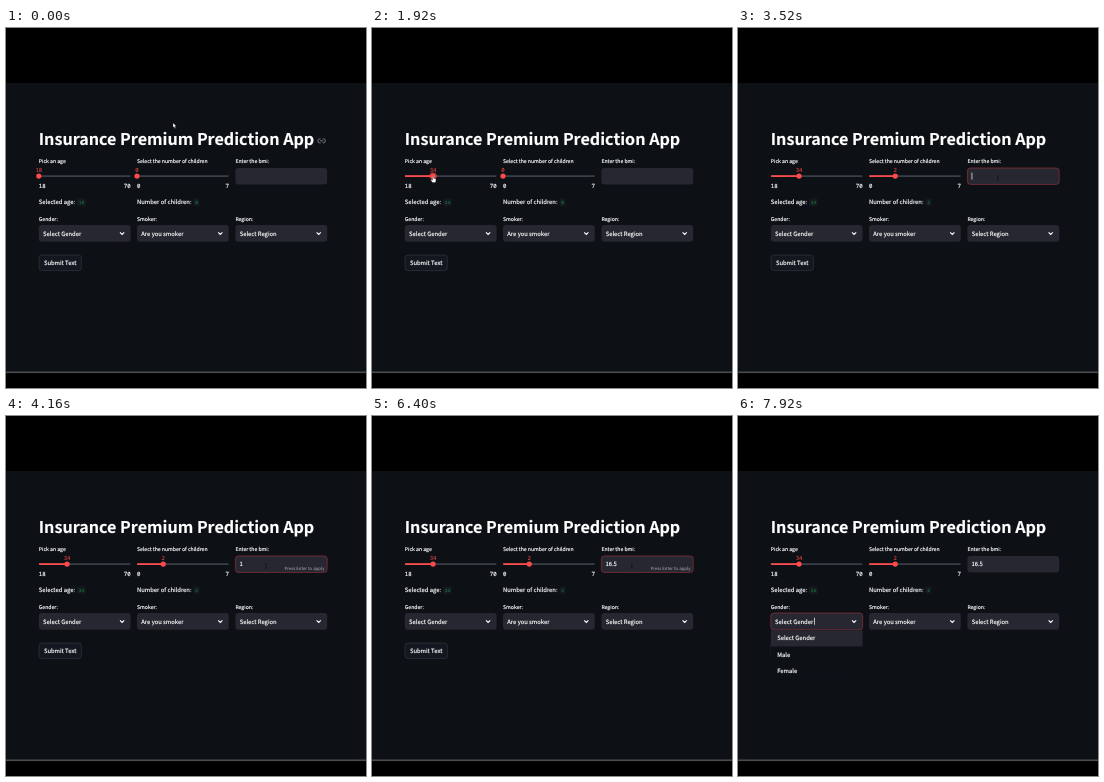
These frames come from a looping animation (360x360 px, 8 s). An HTML page:

```html
<!DOCTYPE html>
<html lang="en">
<head>
<meta charset="utf-8">
<title>Premium prediction form</title>
<style>
  html, body { margin: 0; width: 100%; height: 100%; overflow: hidden; background: #000; }
  svg { display: block; width: 100vw; height: 100vh; }
  text {
    font-family: "Noto Sans CJK JP", "Noto Sans CJK SC", "Noto Sans CJK", "Noto Sans", sans-serif;
    font-size: 5.87px; fill: #fff; stroke: #fff; stroke-width: 0.16px;
    text-rendering: geometricPrecision; white-space: pre;
  }
  .title { font-size: 16.13px; font-weight: 700; }
  .label { font-size: 5.14px; }
  .hint { font-size: 4.32px; fill: #b0b1b6; stroke: none; }
  .mono { font-family: "Noto Sans Mono", "DejaVu Sans Mono", monospace; font-size: 5.7px; }
  .red { fill: #ff4b4b; stroke: none; }
  .code { font-size: 4.39px; fill: #178f41; stroke: none; }
  .mid { text-anchor: middle; }
  .end { text-anchor: end; }
</style>
</head>
<body>
<svg id="stage" viewBox="0 0 360 360"></svg>
<script>
const LOOP = 8000;
const RED = '#ff4b4b', FOCUS = '#a5343b', FIELD = '#262730', PAGE = '#0d1116';
const COLS = [32.8, 131, 229.4], COL_W = 91.8;
const stage = document.getElementById('stage');

function add(tag, attrs, parent = stage) {
  const el = document.createElementNS('http://www.w3.org/2000/svg', tag);
  for (const k in attrs) el.setAttribute(k, attrs[k]);
  parent.appendChild(el);
  return el;
}
function text(x, y, str, cls = '', parent = stage) {
  const el = add('text', { x, y, class: cls }, parent);
  el.textContent = str;
  return el;
}
const rect = (x, y, width, height, fill, rx = 0, parent = stage) =>
  add('rect', { x, y, width, height, fill, rx }, parent);
const path = (d, attrs, parent = stage) => add('path', { d, fill: 'none', ...attrs }, parent);
const show = (el, on) => el.setAttribute('visibility', on ? 'visible' : 'hidden');

function slider(x, label, min, max) {
  text(x, 135.1, label, 'label');
  rect(x, 147.3, COL_W, 1.6, '#3b3e47', 0.8);
  const fill = rect(x, 147.3, 0, 1.6, RED, 0.8);
  const ring = add('circle', { cy: 148.1, r: 3.8, fill: RED, opacity: 0.5 });
  const thumb = add('circle', { cy: 148.1, r: 2.6, fill: RED });
  const value = text(0, 143.7, '', 'mono red mid');
  text(x, 159.7, min, 'mono');
  text(x + COL_W, 159.7, max, 'mono end');
  return (v, focused) => {
    const w = (v - min) / (max - min) * COL_W;
    fill.setAttribute('width', w);
    for (const c of [ring, thumb]) c.setAttribute('cx', x + w);
    value.setAttribute('x', x + w);
    value.textContent = v;
    show(ring, focused);
  };
}

function readout(x, label, codeX, width) {
  text(x, 176.2, label);
  rect(codeX, 170.6, width, 7.4, '#141a1e', 1.2);
  const code = text(codeX + width / 2, 176, '', 'mono code mid');
  return v => { code.textContent = v; };
}

function select(x, label, placeholder) {
  text(x, 192.7, label, 'label');
  const box = rect(x, 197, COL_W, 16.8, FIELD, 3);
  text(x + 4.3, 207.7, placeholder);
  path(`M${x + 81.2} 204.4l2.1 2.1l2.1-2.1`, { stroke: '#fff', 'stroke-width': 1.1 });
  return box;
}

// Page
rect(0, 55, 360, 288.5, PAGE);
rect(0, 343.4, 360, 1.7, '#484a4d');
text(32.8, 117.2, 'Insurance Premium Prediction App', 'title');
const link = path('M314.6 110.9h-.8a2 2 0 0 0 0 4h.8M316.6 110.9h.8a2 2 0 0 1 0 4h-.8M313.9 112.9h3.4',
  { stroke: '#8c8f95', 'stroke-width': 0.8 });

const setAge = slider(COLS[0], 'Pick an age', 18, 70);
const setKids = slider(COLS[1], 'Select the number of children', 0, 7);
const readAge = readout(COLS[0], 'Selected age:', 71, 8.8);
const readKids = readout(COLS[1], 'Number of children:', 187.4, 6.1);

text(COLS[2], 135.1, 'Enter the bmi:', 'label');
const bmiBox = rect(COLS[2], 140, COL_W, 16.4, FIELD, 3);
const bmi = text(233.4, 150.4, '');
const hint = text(318.4, 154.3, 'Press Enter to apply', 'hint end');

const genderBox = select(COLS[0], 'Gender:', 'Select Gender');
select(COLS[1], 'Smoker:', 'Are you smoker');
select(COLS[2], 'Region:', 'Select Region');

add('rect', { x: 33, y: 227, width: 42.4, height: 15.6, rx: 3, fill: '#131720', stroke: '#3c4048', 'stroke-width': 0.5 });
text(37.9, 237, 'Submit Text');

const menu = add('g', {});
rect(COLS[0], 214.2, COL_W, 49.4, PAGE, 2, menu);
rect(COLS[0], 214.2, COL_W, 16.2, FIELD, 0, menu);
['Select Gender', 'Male', 'Female'].forEach((s, i) => text(39.2, 224.3 + i * 16.3, s, '', menu));

const caret = add('rect', { width: 0.7, height: 7, fill: '#fff' });

// Mouse pointers, drawn around their hot spot
const mouse = add('g', {});
const pointers = {
  arrow: path('M0 0v4.6l1.1-1l.8 1.8l.8-.4l-.8-1.7h1.5z',
    { fill: '#fff', stroke: '#000', 'stroke-width': 0.25 }, mouse),
  hand: path('M-.5 0q.6-.6 1 0v2l2 .5q.7.3.5 1.2l-.5 2.6h-3l-1.8-2.4q0-.8.8-.5l1 .6z',
    { fill: '#fff', stroke: '#000', 'stroke-width': 0.25 }, mouse),
  beam: path('M-.9-2.1h1.8M0-2.1v4.2M-.9 2.1h1.8', { stroke: '#0a0b0e', 'stroke-width': 0.55 }, mouse)
};

// time, x, y
const route = [
  [0, 167, 95], [160, 167, 95], [1000, 66, 149.6], [1280, 64.8, 150], [1600, 61, 148.2],
  [2060, 61, 148.2], [2560, 162.2, 142.6], [2760, 157.4, 148], [3000, 157.4, 148],
  [3360, 259.8, 150], [6560, 259.8, 150], [7200, 82, 205.5]
];
const keys = [[3600, '1'], [4800, '16'], [5360, '16.'], [5680, '16.5']];
const AGE_CLICK = 1680, KIDS_CLICK = 2840, BMI_CLICK = 3400, GENDER_CLICK = 7360, RERUN = 240;

const ease = p => p * p * (3 - 2 * p);
function mouseAt(t) {
  const i = route.findIndex(r => r[0] > t);
  if (i < 0) return route[route.length - 1].slice(1);
  const [t0, x0, y0] = route[i - 1], [t1, x1, y1] = route[i];
  const p = ease((t - t0) / (t1 - t0));
  return [x0 + (x1 - x0) * p, y0 + (y1 - y0) * p];
}
const inside = (x, y, left, top, w, h) => x >= left && x <= left + w && y >= top && y <= top + h;

function pointerAt(x, y) {
  if (inside(x, y, COLS[2], 140, COL_W, 16.4)) return 'beam';
  const onSlider = COLS.slice(0, 2).some(c => inside(x, y, c, 144, COL_W, 7));
  const onSelect = COLS.some(c => inside(x, y, c, 197, COL_W, 17));
  return onSlider || onSelect ? 'hand' : 'arrow';
}

function outline(box, on) {
  box.setAttribute('stroke', on ? FOCUS : 'none');
  box.setAttribute('stroke-width', 0.6);
}

function render(t) {
  const [x, y] = mouseAt(t);
  const typing = t >= BMI_CLICK && t < GENDER_CLICK;
  const open = t >= GENDER_CLICK;

  setAge(t < AGE_CLICK ? 18 : 34, t >= AGE_CLICK && t < KIDS_CLICK);
  setKids(t < KIDS_CLICK ? 0 : 2, t >= KIDS_CLICK && t < BMI_CLICK);
  readAge(t < AGE_CLICK + RERUN ? 18 : 34);
  readKids(t < KIDS_CLICK + RERUN ? 0 : 2);
  show(link, t < 600);

  const key = keys.filter(k => k[0] <= t).pop() || [BMI_CLICK, ''];
  bmi.textContent = key[1];
  outline(bmiBox, typing);
  show(hint, typing && key[1] !== '');
  outline(genderBox, open);
  show(menu, open);

  const since = t - (open ? GENDER_CLICK + 40 : key[0]);
  show(caret, (typing || open) && since % 1060 < 530);
  caret.setAttribute('x', open ? 76.2 : 233.6 + (key[1] ? bmi.getComputedTextLength() : 0));
  caret.setAttribute('y', open ? 201.7 : 144.6);

  const shape = pointerAt(x, y);
  for (const k in pointers) pointers[k].setAttribute('display', k === shape ? 'inline' : 'none');
  mouse.setAttribute('transform', `translate(${x} ${y})`);
  show(mouse, t < GENDER_CLICK + 80);
}

function tick(now) {
  render(now % LOOP);
  requestAnimationFrame(tick);
}
render(0);
requestAnimationFrame(tick);
</script>
</body>
</html>
```
